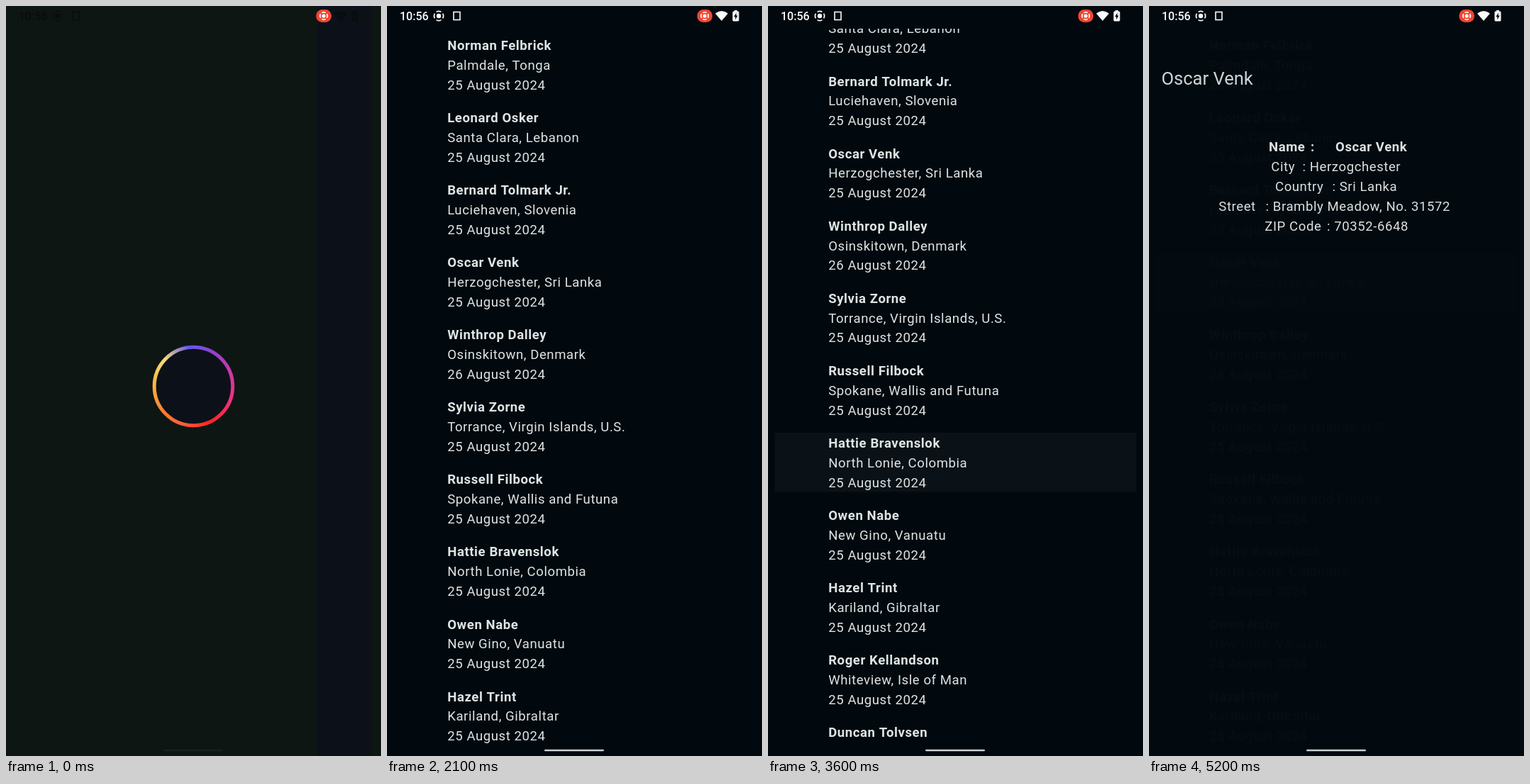
An HTML page with a canvas that plays this animation: 529 px wide and 1058 px high, repeating every 5300 ms.

```html
<!DOCTYPE html>
<html lang="en">
<head>
<meta charset="utf-8">
<title>People list</title>
<style>
  html, body { margin: 0; width: 100%; height: 100%; overflow: hidden; background: #02090e; }
  canvas { display: block; width: 529px; height: 1058px; }
</style>
</head>
<body>
<canvas id="stage" width="529" height="1058"></canvas>
<script>
const ctx = document.getElementById('stage').getContext('2d');
const W = 529, H = 1058, LOOP = 5300, STEP = 100;
const BG = '#02090e', INK = '#dfe4e5', WHITE = '#fafcfc';
const UNIT = 1.16;
const PITCH = 88 * UNIT, LINE = 24 * UNIT, ITEM_H = 72 * UNIT;
const LIST_TOP = 32, LIST_BOTTOM = 1041, FIRST_Y = 55.3;

const people = [
  ['Norman Felbrick', 'Palmdale, Tonga'],
  ['Leonard Osker', 'Santa Clara, Lebanon'],
  ['Bernard Tolmark Jr.', 'Luciehaven, Slovenia'],
  ['Oscar Venk', 'Herzogchester, Sri Lanka'],
  ['Winthrop Dalley', 'Osinskitown, Denmark', 26],
  ['Sylvia Zorne', 'Torrance, Virgin Islands, U.S.'],
  ['Russell Filbock', 'Spokane, Wallis and Futuna'],
  ['Hattie Bravenslok', 'North Lonie, Colombia'],
  ['Owen Nabe', 'New Gino, Vanuatu'],
  ['Hazel Trint', 'Kariland, Gibraltar'],
  ['Roger Kellandson', 'Whiteview, Isle of Man'],
  ['Duncan Tolvsen', 'Eastdale, Malawi'],
  ['Lucille Brandeck', 'Port Selma, Norway']
];

const ringColors = ['#6655ee', '#9640cc', '#d038a4', '#f03080', '#ff2424',
  '#ff5a38', '#ff8030', '#ffb440', '#f8dc7c', '#6655ee'];

const scrollKeys = [[2800, 0], [2900, 28.4], [3000, 100], [3100, 165], [3200, 205], [3300, 225],
  [3400, 225], [3500, 200], [3600, 153.5], [3700, 65], [3800, 0]];
const stretchKeys = [[3700, 1], [3800, 1.01], [3900, 1.003], [4000, 1.001], [4100, 1]];

const clamp = v => Math.max(0, Math.min(1, v));

function sample(keys, t) {
  if (t <= keys[0][0]) return keys[0][1];
  for (let i = 1; i < keys.length; i++) {
    const [t0, v0] = keys[i - 1], [t1, v1] = keys[i];
    if (t <= t1) return v0 + (v1 - v0) * (t - t0) / (t1 - t0);
  }
  return keys[keys.length - 1][1];
}

function text(str, x, midY, { size = 16 * UNIT, weight = 400, spacing = 0.5 * UNIT, color = INK } = {}) {
  ctx.font = `${weight} ${size}px Roboto, sans-serif`;
  ctx.letterSpacing = spacing + 'px';
  ctx.fillStyle = color;
  ctx.fillText(str, x, midY + size * 0.355);
}

function circle(x, y, r) {
  ctx.beginPath();
  ctx.arc(x, y, r, 0, 2 * Math.PI);
}

function polygon(points) {
  ctx.beginPath();
  points.forEach(([x, y]) => ctx.lineTo(x, y));
  ctx.closePath();
  ctx.fill();
}

function recordIcon(x, y, r, dot) {
  ctx.lineWidth = 1.6;
  for (let i = 0; i < 4; i++) {
    const mid = i * Math.PI / 2;
    ctx.beginPath();
    ctx.arc(x, y, r, mid - 0.55, mid + 0.55);
    ctx.stroke();
  }
  circle(x, y, dot);
  ctx.fill();
}

function systemBars(dark) {
  const ink = dark ? '#080d0d' : WHITE;
  ctx.fillStyle = ctx.strokeStyle = ink;
  text('10:56', 18, 14.2, { size: 16, weight: 500, spacing: 0, color: ink });
  recordIcon(73, 14, 6.6, 3.2);
  ctx.lineWidth = 1.6;
  ctx.strokeRect(94, 8.5, 9, 11);

  // wifi
  ctx.beginPath();
  ctx.moveTo(472, 21);
  ctx.lineTo(463, 10.5);
  ctx.quadraticCurveTo(472, 3.5, 481, 10.5);
  ctx.fill();

  // battery
  ctx.beginPath();
  ctx.roundRect(487.5, 7.5, 9, 14, 1.4);
  ctx.rect(490, 6, 4, 2);
  ctx.fill();
  ctx.fillStyle = dark ? '#0c1119' : BG;
  polygon([[492.8, 9.5], [489.3, 15.2], [491.4, 15.2], [491.2, 19.5], [494.7, 13.6], [492.6, 13.6]]);

  ctx.fillStyle = '#ee4632';
  ctx.beginPath();
  ctx.roundRect(437.5, 5, 21.5, 18, 8.5);
  ctx.fill();
  ctx.fillStyle = ctx.strokeStyle = '#fff';
  recordIcon(448.2, 14, 5.2, 2.6);

  ctx.fillStyle = dark ? '#17201e' : '#c9cecf';
  ctx.beginPath();
  ctx.roundRect(222, 1048.8, 84, 2.5, 1.2);
  ctx.fill();
}

function loading(t) {
  const glow = clamp(1 - t / 300);
  if (glow) {
    ctx.globalAlpha = glow;
    ctx.fillStyle = '#0e1613';
    ctx.fillRect(0, 0, W, H);
    ctx.fillStyle = '#0c1119';
    ctx.fillRect(440, 0, 76, H);
    circle(264.5, 536.5, 54);
    ctx.fill();
    ctx.globalAlpha = 1;
  }
  const start = (353 + 0.977 * t - 90) * Math.PI / 180;
  const sweep = ctx.createConicGradient(start, 264.5, 536.5);
  ringColors.forEach((c, i) => sweep.addColorStop(i / (ringColors.length - 1), c));
  ctx.strokeStyle = sweep;
  ctx.lineWidth = 5;
  circle(264.5, 536.5, 55.3);
  ctx.stroke();
}

function ripple(top, age) {
  if (age < 0 || age > 800) return;
  const x = 160, y = top + ITEM_H / 2, r = 150 + age * 2.2;
  const alpha = 0.16 * (1 - age / 900);
  const glow = ctx.createRadialGradient(x, y, 0, x, y, r);
  glow.addColorStop(0, `rgba(235,245,245,${alpha})`);
  glow.addColorStop(0.5, `rgba(235,245,245,${alpha * 0.8})`);
  glow.addColorStop(1, 'rgba(235,245,245,0)');
  ctx.fillStyle = age > 400 ? `rgba(235,245,245,${alpha})` : glow;
  ctx.fillRect(8 * UNIT, top, W - 16 * UNIT, ITEM_H);

  // sparkle in the outer part of the wave
  if (age > 300) return;
  let seed = 7 + age;
  const random = () => (seed = (seed * 16807) % 2147483647) / 2147483647;
  for (let i = 0; i < 450; i++) {
    const side = random() < 0.5 ? -1 : 1;
    const px = x + side * r * (0.3 + 0.6 * random());
    const py = top + random() * ITEM_H;
    ctx.fillStyle = `rgba(235,245,245,${random() * 0.11})`;
    if (px > 10 && px < 519) ctx.fillRect(px, py, 1.2, 1.2);
  }
}

function list(t) {
  const scroll = sample(scrollKeys, t), stretch = sample(stretchKeys, t);
  ctx.save();
  ctx.beginPath();
  ctx.rect(0, LIST_TOP, W, LIST_BOTTOM - LIST_TOP);
  ctx.clip();
  ctx.translate(0, LIST_TOP);
  ctx.scale(1, stretch);
  ctx.translate(0, -LIST_TOP);
  people.forEach(([name, place, day = 25], i) => {
    const y = FIRST_Y + i * PITCH - scroll;
    const top = y - 14.4;
    if (i === 7) ripple(top, t - 2900);
    if (i === 3) ripple(top, t - 5000);
    text(name, 85.2, y, { weight: 700 });
    text(place, 85.2, y + LINE);
    text(`${day} August 2024`, 85.2, y + 2 * LINE);
  });
  ctx.restore();
}

function detail(alpha) {
  const [name, place] = people[3];
  const [city, country] = place.split(', ');
  ctx.globalAlpha = alpha;
  ctx.fillStyle = '#040b10';
  ctx.fillRect(0, 0, W, H);
  text(name, 17.5, 101.5, { size: 22 * UNIT, spacing: 0, color: '#d3d8d9' });
  const bold = { weight: 700 };
  text('Name', 169, 198.7, bold);
  text(':', 228, 198.7, bold);
  text(name, 263, 198.7, bold);
  const rows = [
    ['City', 172.3, city, 216.5],
    ['Country', 178, country, 258.5],
    ['Street', 98.3, 'Brambly Meadow, No. 31572', 164.5],
    ['ZIP Code', 163.3, '70352-6648', 251]
  ];
  rows.forEach(([label, x, value, valueX], i) => {
    const y = 198.7 + (i + 1) * LINE;
    text(label, x, y);
    text(': ' + value, valueX, y);
  });
  ctx.globalAlpha = 1;
}

function draw(t) {
  ctx.fillStyle = BG;
  ctx.fillRect(0, 0, W, H);
  if (t < 1700) loading(t);
  else list(t);
  if (t > 5000) detail(t < 5200 ? 0.55 : 0.98);
  systemBars(t < STEP);
}

const origin = performance.now();
function frame() {
  const t = (performance.now() - origin) % LOOP;
  draw(Math.floor(t / STEP) * STEP);
  requestAnimationFrame(frame);
}
frame();
</script>
</body>
</html>
```
